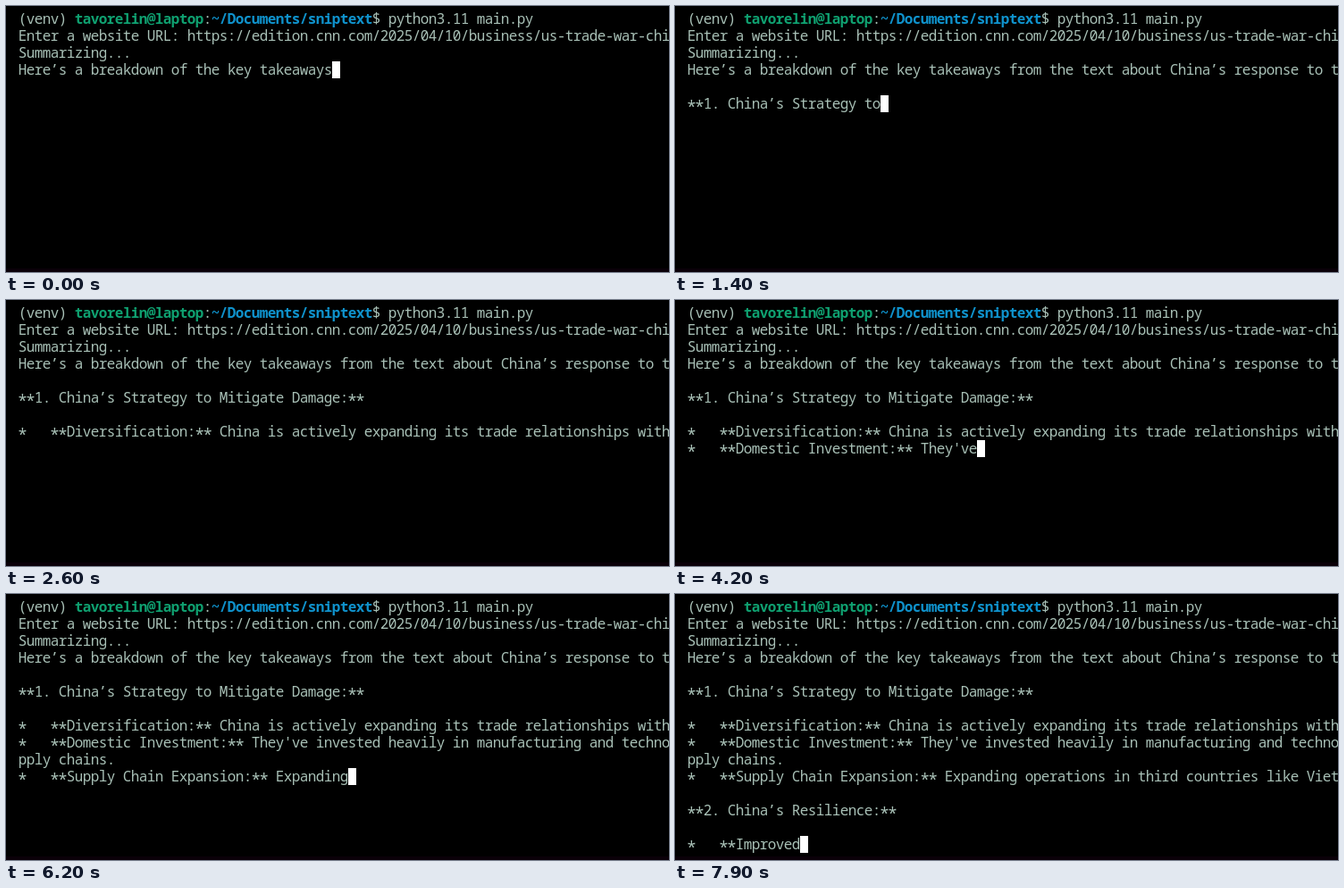
An HTML page for the animation above (8000 ms loop, 742x298 px).

```html
<!DOCTYPE html>
<html lang="en">
<head>
<meta charset="utf-8">
<title>Terminal summary</title>
<style>
  html, body { margin: 0; width: 100%; height: 100%; overflow: hidden; background: #000; }
  body { position: relative; }
  pre {
    position: absolute; left: 13.7px; top: 5px; margin: 0;
    font: 16px/19px "Noto Sans Mono", "DejaVu Sans Mono", monospace;
    letter-spacing: -0.6px;
    font-variant-ligatures: none;
    color: #a8c0b6; white-space: pre;
  }
  b { font-weight: 700; }
  .user { color: #0fa070; }
  .path { color: #0f92cc; }
  /* Large, vertically centred asterisks that keep the 9px cell */
  i {
    font-style: normal; font-size: 19px; line-height: 0; letter-spacing: -2.4px;
    position: relative; left: -0.9px; top: 5px;
  }
  #cursor { position: absolute; width: 9px; height: 19px; background: #fff; }
  #edge { position: absolute; left: 0; right: 0; bottom: 0; height: 4px; background: #0a0008; }
</style>
</head>
<body>
<div id="edge"></div>
<pre>(venv) <b class="user">tavorelin@laptop</b>:<b class="path">~/Documents/sniptext</b>$ python3.11 main.py
Enter a website URL: https://edition.cnn.com/2025/04/10/business/us-trade-war-china
Summarizing...
<span id="out"></span></pre>
<div id="cursor"></div>
<script>
const LOOP = 8000, STEP = 100;
const LEFT = 14, TOP = 5, CELL = 9, LINE = 19, FIRST_ROW = 3;

// Each burst: start time, then one chunk of streamed text per step.
const bursts = [
  [0, "Here’s a breakdown of the key takeaways", " from", " the text", " about",
    " China’s", " response to", " the"],
  [1000, "\n\n**", "1.", " China’s", " Strategy", " to", " Mitigate", " Damage", ":**\n\n", "*"],
  [1900, "   **", "Diversification", ":** China", " is", " actively expanding",
    " its trade", " relationships", " with"],
  [3600, "\n", "*", "   **", "Domestic", " Investment", ":** They", "'ve",
    " invested heavily", " in manufacturing", " and", " technology"],
  [5600, "\npply chains", ".\n", "*", "   **Supply", " Chain", " Expansion",
    ":** Expanding", " operations", " in third", " countries like", " Vietnam"],
  [7100, "\n\n**", "2.", " China", "’s", " Resilience", ":**", "\n\n*", "   **", "Improved"]
];

const out = document.getElementById("out");
const cursor = document.getElementById("cursor");
let shown = null;

function textAt(t) {
  let text = "";
  for (const [start, ...chunks] of bursts) {
    if (t < start) break;
    text += chunks.slice(0, Math.floor((t - start) / STEP) + 1).join("");
  }
  return text;
}

function draw(t) {
  const text = textAt(t);
  if (text === shown) return;
  shown = text;
  out.innerHTML = text.replace(/\*/g, "<i>*</i>");
  const lines = text.split("\n");
  cursor.style.left = LEFT + CELL * lines[lines.length - 1].length + "px";
  cursor.style.top = TOP + LINE * (FIRST_ROW + lines.length - 1) + "px";
}

const begin = performance.now();
function tick() {
  draw((performance.now() - begin) % LOOP);
  requestAnimationFrame(tick);
}
draw(0);
tick();
</script>
</body>
</html>
```
